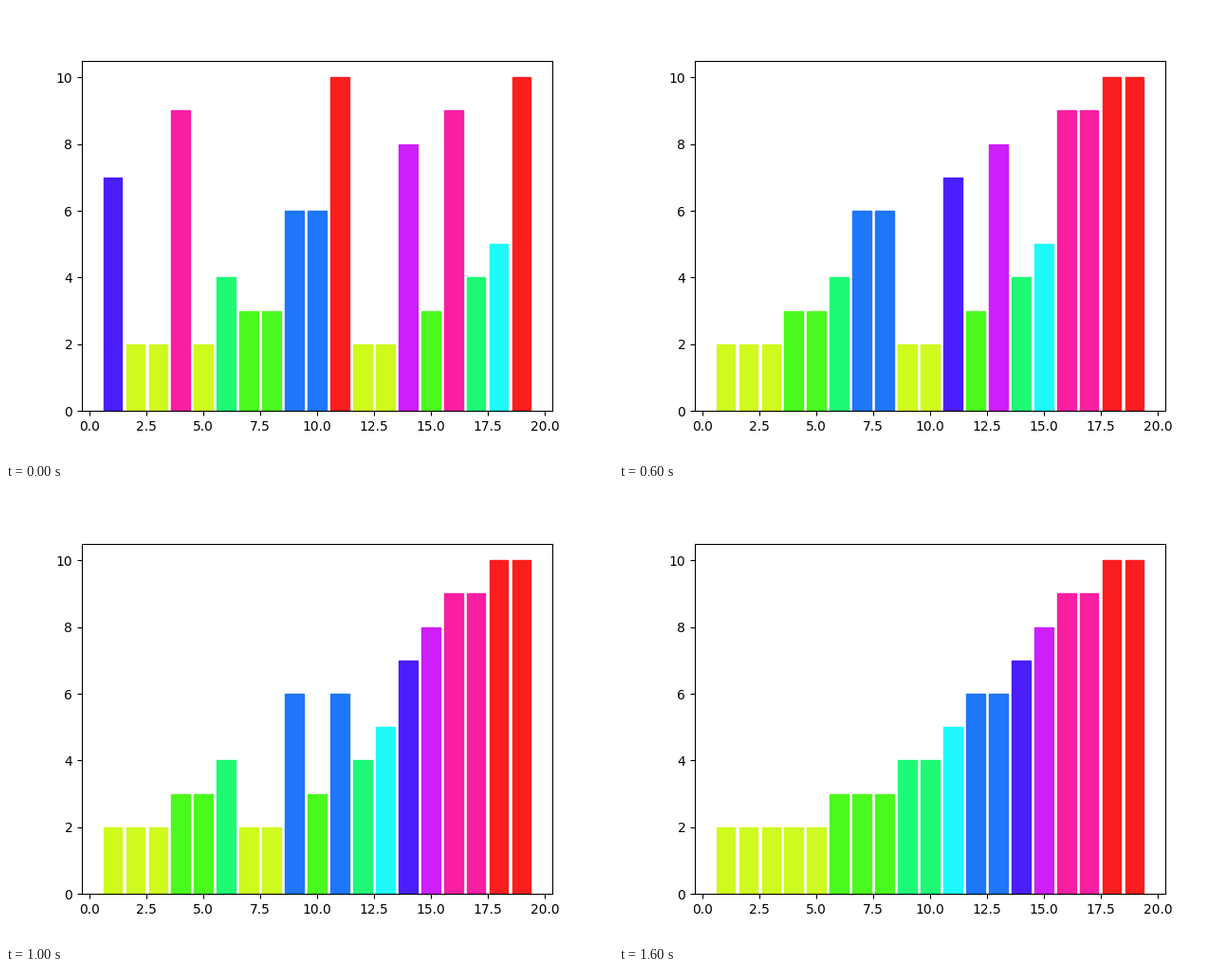
Write a matplotlib script that moves like this. It is 640 px wide and 480 px high and loops after 8 s.

```python
import colorsys

import matplotlib.pyplot as plt
from matplotlib.animation import FuncAnimation

START = [7, 2, 2, 9, 2, 4, 3, 3, 6, 6, 10, 2, 2, 8, 3, 9, 4, 5, 10]
STEP_MS = 200
LOOP_MS = 8000


def bubble_pass(values):
    """Return a copy of values after one sweep of bubble sort."""
    out = list(values)
    for i in range(len(out) - 1):
        if out[i] > out[i + 1]:
            out[i], out[i + 1] = out[i + 1], out[i]
    return out


def sort_states(values):
    states = [values]
    while (swept := bubble_pass(states[-1])) != states[-1]:
        states.append(swept)
    return states


def bar_color(value):
    return colorsys.hsv_to_rgb(value / 10 % 1, 0.88, 0.98)


states = sort_states(START)

fig, ax = plt.subplots(figsize=(6.4, 4.8), dpi=100)
bars = ax.bar(range(1, len(START) + 1), START)


def update(step):
    # Each step is one full sweep; the sorted result then holds.
    values = states[min(step, len(states) - 1)]
    for bar, value in zip(bars, values):
        bar.set_height(value)
        bar.set_color(bar_color(value))
    return bars


anim = FuncAnimation(fig, update, frames=LOOP_MS // STEP_MS,
                     init_func=lambda: update(0), interval=STEP_MS,
                     repeat=True, repeat_delay=0)
plt.show()
```
